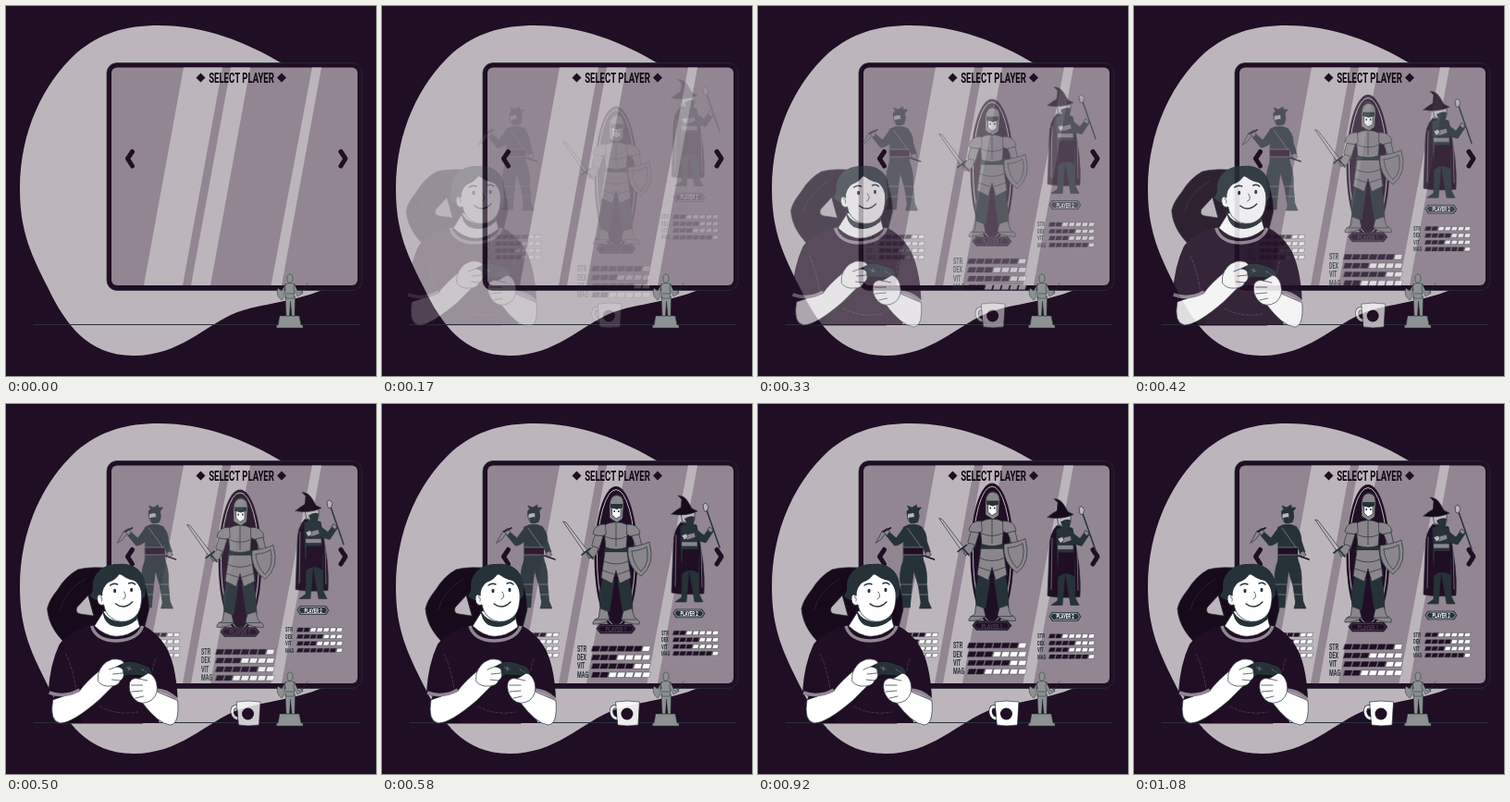
Animation of 400 by 400 pixels, one loop 1120 ms. Source, as an HTML page:

```html
<!DOCTYPE html>
<html lang="en">
<head>
<meta charset="utf-8">
<title>Select player</title>
<style>
html, body { margin: 0; width: 100%; height: 100%; overflow: hidden; background: #200e24; }
svg { display: block; width: 100vw; height: 100vh; stroke-linecap: round; stroke-linejoin: round; }
text { font-family: Roboto, "Liberation Sans", sans-serif; font-weight: 700; }
.ink { fill: #200e24; }
.deep { fill: #170a1b; }
.slate { fill: #263238; }
.steel { fill: #8a868c; }
.mid { fill: #918692; }
.pale { fill: #bcb6bc; }
.white { fill: #fff; }
.edge { stroke: #263238; stroke-width: .7; }
.line { fill: none; stroke: #263238; stroke-width: .7; }
.soft { fill: none; stroke: #918692; stroke-width: .7; }
.cuff { fill: none; stroke: #918692; stroke-width: 3.5; stroke-linecap: butt; }
</style>
</head>
<body>
<svg viewBox="0 0 400 400">
  <rect class="ink" width="400" height="400"/>
  <path class="pale" d="M15 198C15 136 40 84 76 51C102 29 130 21 165 21C214 21 258 38 300 63C352 96 383 150 383 215C383 265 368 297 342 307C310 320 275 322 250 331C215 345 188 378 138 378C88 378 64 343 46 306C28 270 15 245 15 198Z"/>

  <!-- screen -->
  <rect x="109" y="61.500" width="276" height="246" rx="11" class="ink edge"/>
  <rect x="114" y="66.500" width="266" height="235.500" rx="6" class="mid"/>
  <g class="pale">
    <path d="M192 66.500H234L191 302H149Z"/>
    <path d="M243 66.500H264L221 302H200Z"/>
    <path d="M331 66.500H341L298 302H286.500Z"/>
  </g>
  <g class="ink">
    <path d="M205.500 77.500l5-5 5 5-5 5ZM293 77.500l5-5 5 5-5 5Z"/>
    <text transform="translate(254.500 83) scale(.64 1)" font-size="15" text-anchor="middle" style="fill:#0e0610">SELECT PLAYER</text>
  </g>
  <path d="M136.500 157.500L131.500 165L136.500 173M362 157.500L367 165L362 173" fill="none" stroke="#200e24" stroke-width="5"/>

  <!-- rogue -->
  <g id="rogue">
    <g class="slate edge">
      <path d="M156 168Q150 184 153 196L155 217H163L165 196L167 180L172 197L175 217H183L181 194Q182 180 177 168Z"/>
      <path d="M156 133Q166 127 176 133L177 169Q167 173 156 169Z"/>
      <path d="M156 134L148 145L140 138L137 142L146 153Q151 154 160 145Z"/>
      <path d="M175 133Q181 138 181 148L185 160L180 163L175 150L172 141Z"/>
      <path d="M155 214L151 220H163V214ZM175 214L173 221H186L183 214Z"/>
      <path d="M160 121Q159 114 162 114L160 110L165 112L170 109V112L175 112L172 116Q174 122 171 128L163 128Z"/>
    </g>
    <path class="pale edge" d="M161 117H167Q169 122 166 127L161 126L160 122Z"/>
    <path class="slate" d="M161 123L167 122L169 129H163ZM159 116L172 114V117L160 119Z"/>
    <g class="steel edge">
      <path d="M126 150L133 137L137 139L132 146Z"/>
      <path d="M134 137L138 134L141 138L138 142Z"/>
      <path d="M179 161L183 159L186 163L182 166Z"/>
    </g>
    <path d="M172 162L189 168M134 138L142 134" stroke="#200e24" stroke-width="1.800"/>
    <path class="ink" d="M156 155H177V163H156Z"/>
    <path class="soft" d="M156 155H177M156 163H177M160 134L175 155M153 195H165M172 195H181M154 206H164M173 206H182"/>
  </g>

  <!-- knight -->
  <g id="knight">
    <ellipse class="ink" cx="253" cy="164" rx="23.500" ry="77"/>
    <ellipse cx="253" cy="164" rx="20.500" ry="73.500" fill="none" stroke="#bcb6bc"/>
    <g class="slate edge">
      <path d="M239 186L235 203L236 222H246L251 189ZM255 189L260 222H271L270 203L267 186Z"/>
      <path d="M242 152H264L266 160H240Z"/>
    </g>
    <g class="steel edge">
      <path d="M241 158L237 186L249 192L253 178L257 192L269 186L265 158Z"/>
      <path d="M240 129Q253 122 266 129L264 153Q253 157 242 153Z"/>
      <path d="M241 128Q230 127 228 138Q234 144 242 139ZM265 128Q277 127 279 138Q272 144 265 139Z"/>
      <path d="M230 140L227 150L229 158L234 157L239 141ZM270 141L275 154L281 152L278 139Z"/>
      <path d="M228 152L221 159L224 165L231 162L234 154Z"/>
      <path d="M236 219L244 222L246 231Q240 236 228 236Q227 232 234 229ZM261 222L270 219L273 229Q280 232 278 236Q265 236 259 231Z"/>
      <path d="M246 121V107Q247 96 255 96Q262 98 261 109L260 122L254 126Z"/>
      <path d="M266 153Q281 151 289 147Q296 172 280 184Q264 173 266 153Z"/>
    </g>
    <path class="white edge" d="M249 110L258 110L258 119L253 122L249 118Z"/>
    <path class="slate" d="M247 106H260V110L254 112L247 110ZM249 98Q254 92 260 99L254 97ZM250.500 113h1.500v2h-1.500ZM255 113h1.500v2H255Z"/>
    <path class="line" d="M253 126V152M241 141Q253 147 265 141M240 168Q253 174 266 168M239 178L251 182M255 182L267 178M270 157Q281 156 286 152Q290 170 280 179Q271 170 270 157M230 231H246M260 231H275"/>
    <path class="pale edge" d="M196 125L199 126L222 156L219 158Z"/>
    <path d="M216 161L225 154M222 158L228 165" stroke="#263238" stroke-width="1.700"/>
    <path class="ink edge" d="M236 236H270L274 241L270 246H236L232 241Z"/>
    <path class="soft" opacity=".5" d="M237 237.500H269L272 241L269 244.500H237L234 241Z"/>
    <text transform="translate(253 244) scale(.64 1)" font-size="8" text-anchor="middle" fill="#4b3c50">PLAYER 1</text>
  </g>

  <!-- wizard -->
  <g id="wizard">
    <path class="ink edge" d="M323 130Q315 138 315 155L313 206Q326 209 348 207Q350 177 340 133Z"/>
    <path class="slate edge" d="M325 168L324 211L317 216H329L332 180L337 210L338 216H347L343 208L342 168Z"/>
    <path class="slate edge" d="M323 134Q332 129 340 135L342 172L324 172Z"/>
    <path class="slate edge" d="M339 137L348 144L354 136L358 140L350 152L339 149Z"/>
    <path class="ink" d="M325 159H342V185Q333 178 324 186Z"/>
    <path class="pale edge" d="M323 118H338L338 127L335 134L331 131L325 129Z"/>
    <path class="slate" d="M327 126Q333 122 338 124L336 137L330 132Z"/>
    <path class="deep edge" d="M313 121Q319 116 323 114L324 105L320 101Q327 101 331 108L335 115L341 118Q328 124 313 121Z"/>
    <path class="steel edge" d="M324 151H341V156H324ZM326 144L338 141L339 146L330 149ZM352 138L354 135L358 138L356 141Z"/>
    <path class="pale edge" d="M324 144L329 142L331 146L327 149Z"/>
    <path d="M350 114L365 157" stroke="#263238" stroke-width="1.500"/>
    <path class="pale edge" d="M348 117L347 111L350 109L353 113L351 118Z"/>
    <path class="soft" d="M318 144L317 199M345 152L346 200"/>
    <path class="slate edge" d="M318 224H346L349 228.500L346 233H318L315 228.500Z"/>
    <path d="M319 225H345L347.500 228.500L345 232H319L316.500 228.500Z" fill="none" stroke="#bcb6bc" stroke-width=".8"/>
    <text class="white" transform="translate(332 231) scale(.64 1)" font-size="6.800" text-anchor="middle">PLAYER 2</text>
  </g>

  <path d="M30 344.500H382" stroke="#263238"/>

  <!-- gamer -->
  <g id="gamer">
    <path class="deep edge" d="M57 345C51 332 51 318 60 306L72 264C58 252 48 238 47 221Q49 212 58 201Q67 186 80 179Q95 175 118 178L145 180Q157 199 157 222L150 250V345Z"/>
    <path class="line" d="M61 222Q66 202 88 189M57 316Q64 326 60 342"/>
    <path class="pale edge" d="M91 207L79 220Q77 226 83 227L97 229Z"/>
    <path class="slate" d="M93 207Q97 203 96 196C97 181 110 172 124 173C142 171 154 183 153 199L153 207L149 212H104Q97 213 93 207Z"/>
    <path class="ink" d="M95 239Q70 246 60 260Q50 281 48 312Q60 322 82 318L84 345H168L163 309Q178 309 188 318Q186 280 175 262Q165 246 150 239Q122 262 95 239Z"/>
    <path class="white edge" d="M108 224L98 240Q121 262 147 241L143 226Z"/>
    <path class="slate" d="M106 220Q109 231 119 234Q132 239 145 225L144 233Q130 245 115 239Q107 234 106 220Z"/>
    <path class="white edge" d="M106 202C109 188 118 186 125 184C136 184 146 190 149 203Q150 223 142 230Q133 238 121 234Q110 229 108 217Q102 219 101 211Q101 204 106 207Z"/>
    <path class="slate" d="M126 182Q122 190 113 193Q107 197 106 208Q99 200 104 187Q112 177 126 182ZM124 182Q131 189 141 191Q148 195 149 206Q154 194 145 183Q137 177 124 182Z"/>
    <g class="slate"><ellipse cx="120" cy="202" rx="1.500" ry="2.300"/><ellipse cx="138" cy="201" rx="1.500" ry="2.300"/></g>
    <path d="M115 196Q119 193 123 195M135 194Q139 192 142 195M121 216Q130 223 139 214" fill="none" stroke="#263238" stroke-width="1.400"/>
    <path class="line" d="M130 203Q134 209 129 211M104 208Q107 209 106 213"/>
    <path class="cuff" d="M95 240Q100 256 122 256Q145 255 150 240"/>
    <path class="soft" opacity=".45" d="M67 270Q75 286 79 314M164 276Q158 290 161 308M104 327Q122 337 145 333" stroke-dasharray="3 2"/>

    <path class="white edge" d="M53 320Q49 343 61 345Q74 345 103 320L119 304L105 287Q89 300 82 310Z"/>
    <path class="cuff" d="M49 312Q66 318 82 309"/>
    <path class="white edge" d="M188 321Q190 346 180 347Q167 346 149 322L161 305L166 311Z"/>
    <path class="cuff" d="M164 309Q176 309 187 319"/>
    <path class="slate" stroke="#170a1b" d="M128 280Q134 276 146 280L157 284Q162 290 160 298Q156 300 152 294L134 293Q127 297 122 292Z"/>
    <path class="soft" d="M133 285L138 287M136 284L135 288M149 287L151 288M153 289L154 290"/>
    <path class="white edge" d="M102 292Q105 280 117 276Q128 275 130 280L122 284Q130 285 129 290Q131 296 126 299Q124 305 115 305Q107 306 102 300Z"/>
    <path class="line" d="M122 284L114 287M128 291L118 292M126 299L117 298"/>
    <path class="white edge" d="M136 301Q139 295 146 297L156 291Q162 292 165 301Q168 313 160 320Q149 327 141 319Q134 311 136 301Z"/>
    <path class="line" d="M146 297L155 299M138 304L150 304M138 311L150 310M142 318L151 316"/>
  </g>

  <!-- mug -->
  <g id="mug">
    <path d="M257 328Q250 325 250 333Q251 341 259 340" fill="none" stroke="#263238" stroke-width="4"/>
    <path d="M257 328Q250 325 250 333Q251 341 259 340" fill="none" stroke="#fff" stroke-width="2.600"/>
    <path class="white edge" d="M255 322Q267 320 280.500 322L279 347Q267 349 257 347Z"/>
    <circle class="ink" cx="267" cy="335" r="6.500"/>
  </g>

  <!-- statuette -->
  <g fill="#8d9192" stroke="#263238" stroke-width=".5">
    <path d="M296 335H317L319 345H321V348H292.500V345H294Z"/>
    <path d="M302 314L303 335H306.500L307.500 319L309 335H312L312.500 314Z"/>
    <path d="M301.500 301Q307 298 312.500 301L311 316H303Z"/>
    <path d="M302 301L298 308L294 305Q291 313 298 318Q302 314 301 308ZM312 301L316 310L320 308L321 310.500L315 314L311 306Z"/>
    <path d="M304 297V292L307 289.500L310 292V297L307 299.500ZM319 311L326 300"/>
    <path fill="none" d="M303 311H312"/>
  </g>
</svg>
<script>
const NS = "http://www.w3.org/2000/svg";
const byId = id => document.getElementById(id);

function add(parent, tag, attrs, text = "") {
  const el = document.createElementNS(NS, tag);
  for (const key in attrs) el.setAttribute(key, attrs[key]);
  el.textContent = text;
  parent.append(el);
}

// Four labelled meters of seven slanted cells
function addStats(id, x, y, pitch, size, cell, gap, levels) {
  const group = byId(id), h = size * .64, slant = h * .3;
  ["STR", "DEX", "VIT", "MAG"].forEach((label, row) => {
    const mid = y + row * pitch;
    add(group, "text", {
      transform: `translate(${x} ${mid + size * .36}) scale(.64 1)`,
      "font-size": size, class: "slate"
    }, label);
    for (let i = 0; i < 7; i++) {
      const left = x + gap + i * cell, w = cell - 1.4;
      add(group, "path", {
        d: `M${left + slant} ${mid - h / 2}h${w}l${-slant} ${h}h${-w}Z`,
        class: i < levels[row] ? "ink" : "white",
        stroke: "#263238", "stroke-width": .4
      });
    }
  });
}
addStats("knight", 211, 262.5, 9.4, 8.5, 9.1, 15.5, [6, 3, 5, 2]);
addStats("wizard", 302, 249.5, 7.4, 6.6, 7.1, 12.5, [2, 4, 3, 6]);
addStats("rogue", 131, 249.5, 7.4, 6.6, 7.1, 13, [5, 4, 3, 4]);

const LOOP = 1120, STEPS = 27, REACH = 26;
// Step and share of the way, with an overshoot before settling
const path = [[0, 0], [1, 0], [2, .03], [6, .31], [10, .66], [14, .92],
  [17, 1.045], [20, 1.07], [22, 1.055], [26, 1]];
// Direction, pace, furthest share of the way, fade speed
const movers = [
  ["gamer", 1, 0, 1.15, 1, 1.3],
  ["mug", 1, 0, 1, 2, 1],
  ["rogue", 1, 0, 1, 2, .96],
  ["knight", 0, -1, 1, 2, 1.1],
  ["wizard", 0, 1, 1, 2, 1.2]
].map(([id, ...rest]) => [byId(id), ...rest]);

const startOf = step => Math.round(step * 25 / 6) * 10;

function progress(step) {
  const i = Math.max(1, path.findIndex(p => p[0] >= step));
  const [s0, v0] = path[i - 1], [s1, v1] = path[i];
  return v0 + (v1 - v0) * (step - s0) / (s1 - s0);
}

function draw(time) {
  let step = STEPS - 1;
  while (step > 0 && startOf(step) > time) step--;
  const p = progress(step);
  // Fading in never reverses once the parts have arrived
  const arrived = step > 16;
  for (const [el, dx, dy, pace, limit, fade] of movers) {
    const shift = (Math.min(limit, p * pace) - 1) * REACH;
    el.setAttribute("transform", `translate(${dx * shift} ${dy * shift})`);
    el.setAttribute("opacity", arrived ? 1 : Math.min(1, p * fade));
  }
}

const start = performance.now();
function tick() {
  draw((performance.now() - start) % LOOP);
  requestAnimationFrame(tick);
}
tick();
</script>
</body>
</html>
```
